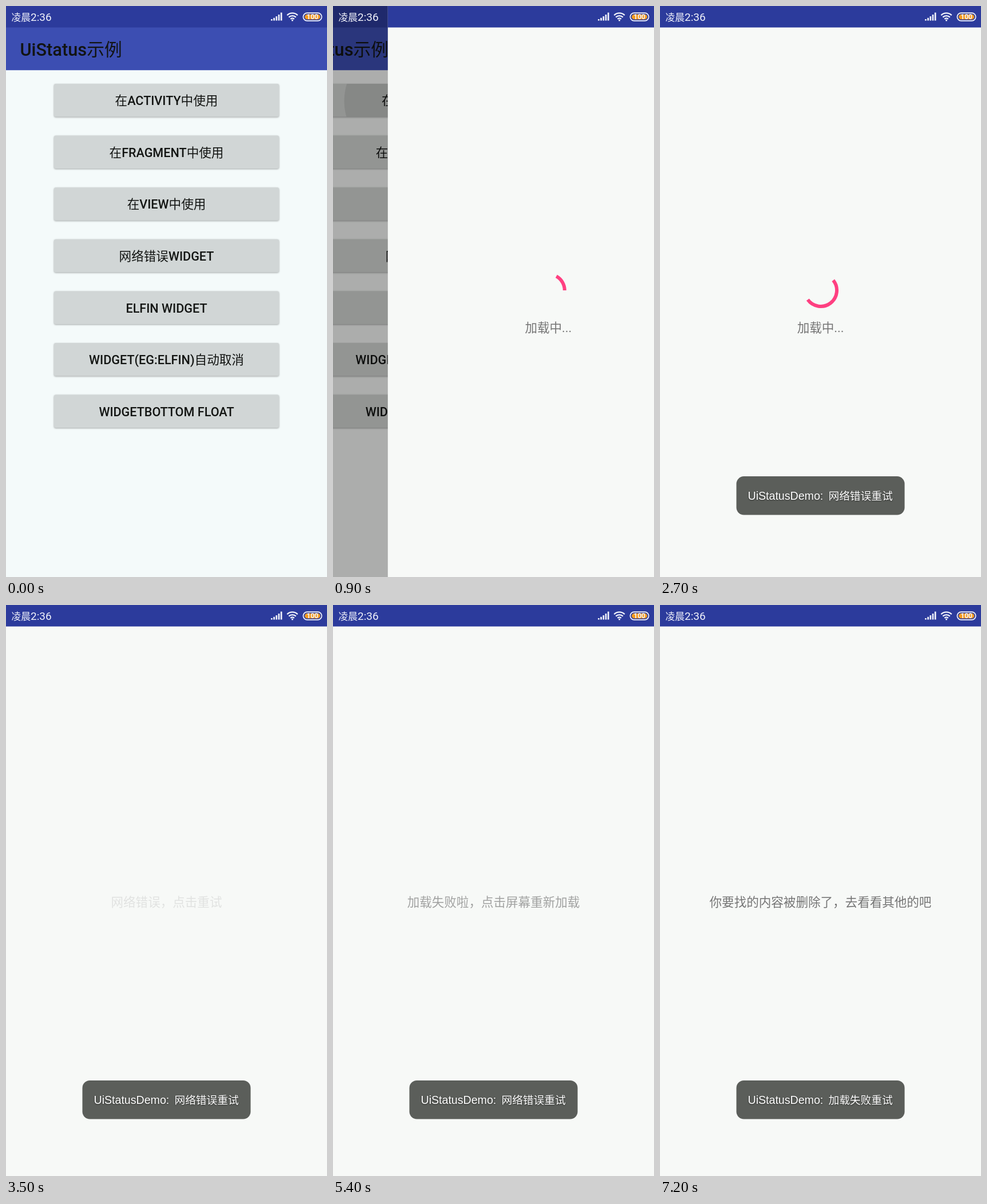
An HTML page for the animation above (8000 ms loop, 561x998 px).

```html
<!DOCTYPE html>
<html lang="zh-CN">
<head>
<meta charset="utf-8">
<title>UiStatus</title>
<style>
  html, body { margin: 0; width: 100%; height: 100%; overflow: hidden; background: #f7f9f7; }
  svg { display: block; width: 561px; height: 998px; font-family: Roboto, "Noto Sans CJK SC", "Noto Sans CJK", sans-serif; }
  .bg { fill: var(--bg, #f7f9f7); }
  .status { fill: #2c3b9c; }
  .dark { fill: #121412; }
  .medium tspan { font-weight: 500; }
  .button { fill: var(--button, #d4d6d4); filter: drop-shadow(0 1px 1.5px rgba(0, 0, 0, .34)); }
  .grey { fill: #757575; font-size: 21.55px; text-anchor: middle; }
  .toast rect { fill: #5b5e5a; }
  .toast text { fill: #fff; font-size: 18.7px; filter: drop-shadow(0 1px 1px rgba(0, 0, 0, .5)); }
  .toast .latin { font-family: "Liberation Sans", Arial, sans-serif; font-size: 19.6px; }
</style>
</head>
<body>
<svg viewBox="0 0 561 998">
  <clipPath id="firstButton"><rect x="84" y="136" width="393" height="57.5" rx="3"/></clipPath>

  <g id="home">
    <rect class="bg" width="561" height="998"/>
    <rect class="status" width="561" height="38"/>
    <rect y="37.5" width="561" height="74.7" fill="#3c4eb2"/>
    <text class="dark medium" x="24.5" y="87" font-size="30.8"><tspan>UiStatus</tspan>示例</text>
    <g id="buttons"></g>
    <g clip-path="url(#firstButton)">
      <circle id="ripple" cy="166" fill="#000" fill-opacity=".09"/>
    </g>
    <g id="labels" class="dark medium" font-size="21.6" text-anchor="middle"></g>
    <circle id="pointer" cx="157.5" cy="167" r="17.5" fill="#f0f1ef" fill-opacity=".85" stroke="#b9bfdc" stroke-width="1.7"/>
  </g>
  <rect id="dim" width="561" height="998"/>

  <g id="page">
    <rect class="bg" width="561" height="998"/>
    <rect class="status" width="561" height="37.5"/>
    <g id="loading">
      <path id="arc" fill="none" stroke="#ff4081" stroke-width="6"/>
      <text class="grey" x="280.5" y="570">加载中...</text>
    </g>
    <text id="message" class="grey" x="280.5" y="527"></text>
  </g>

  <g id="statusIcons" fill="#f1f3fb">
    <text x="9.5" y="26" font-size="16.8">凌晨<tspan font-size="19">2:36</tspan></text>
    <path d="M463 25.5v-2.5h2.7v2.5zM467.2 25.5v-4.7h2.7v4.7zM471.4 25.5v-7.5h2.7v7.5zM475.6 25.5v-10.5h2.7v10.5zM479.8 25.5v-14h2.7v14z"/>
    <path d="M491.3 16.2a13 13 0 0 1 18.4 0M494.3 19.6a8.8 8.8 0 0 1 12.4 0M497.3 22.8a4.6 4.6 0 0 1 6.4 0" fill="none" stroke="#f1f3fb" stroke-width="2.3"/>
    <circle cx="500.5" cy="25" r="1.5"/>
    <rect x="519.4" y="12.2" width="32.4" height="13.6" rx="6.8" fill="none" stroke="#f1f3fb" stroke-width="1.7"/>
    <rect x="522" y="14.6" width="27.2" height="8.8" rx="4.4" fill="#f39a1f"/>
    <text x="535.6" y="23.3" font-size="12" font-weight="700" text-anchor="middle">100</text>
  </g>
  <g id="toasts"></g>
</svg>
<script>
const LOOP = 8000, STEP = 100, LOAD_TIME = 1010, FADE = 300;
const $ = id => document.getElementById(id);
const clamp = x => Math.min(1, Math.max(0, x));
const ease = x => (1 - Math.cos(Math.PI * clamp(x))) / 2;
const quartOut = x => 1 - (1 - clamp(x)) ** 4;
const overshoot = x => {
  const s = clamp(x) - 1;
  return s * s * (3 * s + 2) + 1;
};
const set = (el, attrs) => {
  for (const k in attrs) el.setAttribute(k, attrs[k]);
};

const names = ['在ACTIVITY中使用', '在FRAGMENT中使用', '在VIEW中使用', '网络错误WIDGET',
  'ELFIN WIDGET', 'WIDGET(EG:ELFIN)自动取消', 'WIDGETBOTTOM FLOAT'];
const wrapLatin = s => s.replace(/[ -~]+/g, m => `<tspan>${m}</tspan>`);
names.forEach((name, i) => {
  const y = 136 + 90.6 * i;
  $('buttons').innerHTML += `<rect class="button" x="84" y="${y}" width="393" height="57.5" rx="3"/>`;
  $('labels').innerHTML += `<text x="280.5" y="${Math.round(y + 37.2)}">${wrapLatin(name)}</text>`;
});

// Each load: spinner start, fade-in start, message that follows
const loads = [
  { at: 736, fade: 0, text: '网络错误\uff0c点击重试' },
  { at: 2410, fade: 2410, text: '网络错误\uff0c点击重试' },
  { at: 4210, fade: 4210, text: '加载失败啦\uff0c点击屏幕重新加载' },
  { at: 5830, fade: 5880, text: '你要找的内容被删除了\uff0c去看看其他的吧' }
];
const toasts = [
  { text: '网络错误重试', from: 2430, until: 5860 },
  { text: '加载失败重试', from: 6130, until: LOOP }
];
for (const toast of toasts) {
  $('toasts').innerHTML += `<g class="toast">
    <rect x="133.5" y="831" width="294" height="67.5" rx="13"/>
    <text class="latin" x="153.5" y="872">UiStatusDemo:</text>
    <text x="294.5" y="872">${toast.text}</text></g>`;
}
toasts.forEach((toast, i) => toast.el = $('toasts').children[i]);

// y of a cubic easing (x1,0)-(x2,1) that ends at (x3,1)
function bezier(x, x1, x2, x3) {
  let lo = 0, hi = 1;
  for (let i = 0; i < 20; i++) {
    const s = (lo + hi) / 2, r = 1 - s;
    if (3 * x1 * s * r * r + 3 * x2 * s * s * r + x3 * s ** 3 < x) lo = s; else hi = s;
  }
  return lo * lo * (3 - 2 * lo);
}

// Indeterminate ring: trimmed ends plus a steady turn
function arcPath(ms) {
  const u = ms % 1333 / 1333;
  const head = .75 * bezier(Math.min(u, .5), .2, .1, .5);
  const tail = u < .5 ? 0 : .75 * bezier(u - .5, .2, .1, .5);
  const turn = -.25 + .25 * u + ms / 3333;
  const point = f => {
    const a = 2 * Math.PI * (turn + f);
    return `${281 + 28 * Math.cos(a)} ${497 + 28 * Math.sin(a)}`;
  };
  return `M${point(tail)}A28 28 0 ${head - tail > .5 ? 1 : 0} 1 ${point(head)}`;
}

function drawHome(t) {
  const root = document.documentElement.style;
  root.setProperty('--bg', t < 300 ? '#f4fafa' : '#f7f9f7');
  root.setProperty('--button', t < 300 ? '#d1d6d6' : '#d4d6d4');
  const slide = quartOut((t - 750) / 420);
  const grow = clamp((t - 750) / 270);
  set($('home'), { transform: `translate(${-127.5 * slide} 0)` });
  set($('page'), { transform: `translate(${561 * (1 - slide)} 0)` });
  set($('dim'), { opacity: .37 * slide });
  set($('ripple'), { cx: 157.5 + 123 * grow, r: 181 * grow });
  set($('pointer'), { opacity: t >= 500 && t < 800 ? 1 : 0 });
}

function drawPage(t) {
  let load = loads[0];
  for (const item of loads) if (t >= item.at) load = item;
  const ms = Math.max(0, t - load.at);
  const done = ms >= LOAD_TIME;
  set($('loading'), { opacity: done ? 0 : ease((t - load.fade) / FADE) });
  set($('arc'), { d: arcPath(ms) });
  set($('message'), { opacity: ease((ms - LOAD_TIME) / FADE) });
  if ($('message').textContent !== load.text) $('message').textContent = load.text;
}

function drawToasts(t) {
  for (const { el, from, until } of toasts) {
    const rise = 68 * (1 - overshoot((t - from) / 500));
    const alpha = clamp((t - from) / 200) * (1 - ease((t - until) / 570));
    set(el, { transform: `translate(0 ${rise})`, opacity: alpha });
  }
}

function draw(now) {
  const t = Math.floor(now % LOOP / STEP) * STEP;
  drawHome(t);
  drawPage(t);
  drawToasts(t);
  requestAnimationFrame(draw);
}
draw(performance.now());
</script>
</body>
</html>
```
